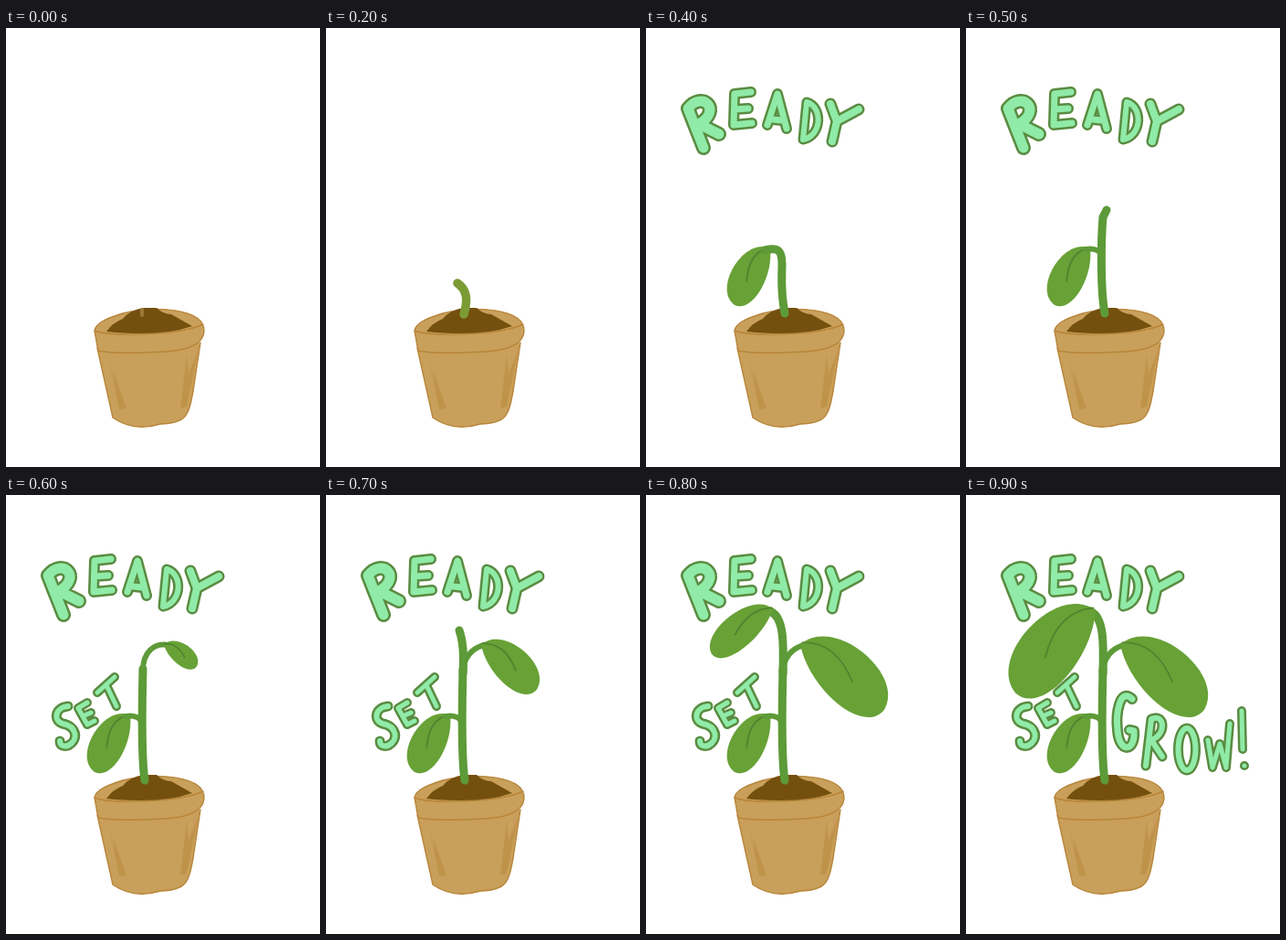
Write an HTML page that moves like this. It is 344 px wide and 480 px high and loops after 1.1 s.

```html
<!DOCTYPE html>
<html lang="en">
<head>
<meta charset="utf-8">
<title>Ready, set, grow</title>
<style>
@property --t { syntax: "<number>"; inherits: true; initial-value: 0; }
@keyframes clock { from { --t: 0 } to { --t: 1100 } }

html, body { margin: 0; width: 100%; height: 100%; overflow: hidden; background: #fff; }
svg {
  --from: 0; --to: 1200;
  display: block; width: 344px; height: 480px;
  animation: clock 1100ms linear infinite;
}
/* A part shows while --from <= --t < --to, with hard cuts. */
.part { opacity: calc(1000 * min(var(--t) - var(--from) + .5, var(--to) - var(--t) - .5)); }

path { stroke-linecap: round; stroke-linejoin: round; }
.stem, .vein, .rim, .letter { fill: none; }
.stem { stroke: #5d9a38; stroke-width: 9; }
.thin { stroke-width: 6; }
.leaf { fill: #68a136; }
.vein { stroke: #4d842f; stroke-width: 1.7; vector-effect: non-scaling-stroke; }
.clay { fill: #c8a05b; }
.clay, .rim { stroke: #b88539; stroke-width: 1.4; }
.streak { fill: #ba893f; opacity: .55; }

/* Letters are skeletons drawn twice: a wide outline, then a narrower filling. */
.letter { stroke-width: calc(var(--w) - var(--inset)); }
.outline { --inset: 0px; stroke: #5a8b41; }
.filling { --inset: 5px; stroke: #8feba7; }
</style>
</head>
<body>
<svg viewBox="0 0 344 480" role="img" aria-label="Ready, set, grow!">
  <defs>
    <!-- A leaf of length 1 that grows from its base along x. -->
    <g id="leaf">
      <path class="leaf" d="M0 0C.05 .42 .95 .42 1 .02C1 -.28 .35 -.28 0 0"/>
      <path class="vein" d="M0 .03Q.24 .24 .6 .04"/>
    </g>
    <g id="ready">
      <path class="letter" style="--w:16px" d="M63 131L46 88C62 68 84 90 58 105L80 116"/>
      <path class="letter" style="--w:12px" d="M115 70L97 72L96 106L116 104M97 89L112 88"/>
      <path class="letter" style="--w:12px" d="M133 106L144 72L154 110M139 100L149 101"/>
      <path class="letter" style="--w:11px" d="M176 81L172 122C193 118 194 86 176 81Z"/>
      <path class="letter" style="--w:13px" d="M202 83L209 102L204 124M209 102L233 89"/>
    </g>
    <g id="set">
      <path class="letter" style="--w:11px" d="M68 231C54 232 51 246 62 250C78 253 80 268 68 274Q59 276 59 269"/>
      <path class="letter" style="--w:10px" d="M89 227L79 233L89 251L97 247M84 242L93 238"/>
      <path class="letter" style="--w:10px" d="M100 216L119 199M110 208L121 231"/>
    </g>
    <g id="grow">
      <path class="letter" style="--w:12px" d="M182 223C168 210 164 240 166 257C168 284 186 280 184 258L179 257"/>
      <path class="letter" style="--w:11px" d="M197 296L203 245C218 238 220 262 203 268L215 286"/>
      <path class="letter" style="--w:11px" d="M242 255a9.5 23 0 0 1 0 46a9.5 23 0 0 1 0-46"/>
      <path class="letter" style="--w:10px" d="M265 268L270 298L278 272L285 298L289 250"/>
      <path class="letter" style="--w:10px" d="M302 236L303 278M305 296h.01"/>
    </g>
  </defs>

  <g id="pot">
    <path class="clay" d="M100 350L117 426Q140 442 169 433C198 432 200 424 205 397L213 344"/>
    <path class="clay" d="M97 331C98 322 112 317 128 312C165 303 217 307 217 331C216 356 170 354 146 355Q120 356 101 353Z"/>
    <path class="rim" d="M97 331C115 338 190 336 216 324"/>
    <path class="streak" d="M112 359L119 388L118 376L132 416L124 417ZM211 350L198 414L191 416L198 357L200 378Z"/>
    <path fill="#74500f" d="M110 332Q117 322 128 318Q136 308 151 306L165 306Q172 313 181 313L204 326Q170 338 110 332Z"/>
  </g>

  <path class="part" style="--to:200" d="M149 308v6" stroke="#9d7735" stroke-width="4"/>
  <path class="part" style="--from:200;--to:400" d="M151 313C155 300 156 287 144 279" fill="none" stroke="#7b9b35" stroke-width="9.5"/>

  <use class="part" style="--from:400" href="#leaf" transform="translate(136 241) rotate(122) scale(73)"/>
  <path class="part stem" style="--from:400;--to:500" d="M152 312C147 285 149 275 149 258S143 240 130 243"/>
  <path class="part stem thin" style="--from:500" d="M148 247Q143 240 131 242"/>
  <path class="part stem" style="--from:500;--to:600" d="M152 312C147 285 148 230 150 207L154 199"/>
  <path class="part stem" style="--from:600" d="M152 312C148 285 149 230 150 190"/>

  <path class="part stem thin" style="--from:600;--to:700" d="M150 192C150 172 162 161 178 164"/>
  <use class="part" style="--from:600;--to:700" href="#leaf" transform="translate(173 164) rotate(34) scale(43 -43)"/>

  <path class="part stem thin" style="--from:700" d="M151 186Q156 168 174 164"/>
  <path class="part stem" style="--from:700;--to:800" d="M150 195Q152 165 146 148"/>
  <use class="part" style="--from:700;--to:800" href="#leaf" transform="translate(170 164) rotate(40) scale(78 -78)"/>

  <path class="part stem" style="--from:800" d="M150 195C151 160 152 124 128 126"/>
  <use class="part" style="--from:800" href="#leaf" transform="translate(169 164) rotate(39) scale(116 -116)"/>
  <use class="part" style="--from:800;--to:900" href="#leaf" transform="translate(139 125) rotate(143) scale(83 70)"/>
  <use class="part" style="--from:900" href="#leaf" transform="translate(142 126) rotate(133) scale(126)"/>

  <g class="part" style="--from:400"><use class="outline" href="#ready"/><use class="filling" href="#ready"/></g>
  <g class="part" style="--from:600"><use class="outline" href="#set"/><use class="filling" href="#set"/></g>
  <g class="part" style="--from:900"><use class="outline" href="#grow"/><use class="filling" href="#grow"/></g>
</svg>
</body>
</html>
```
